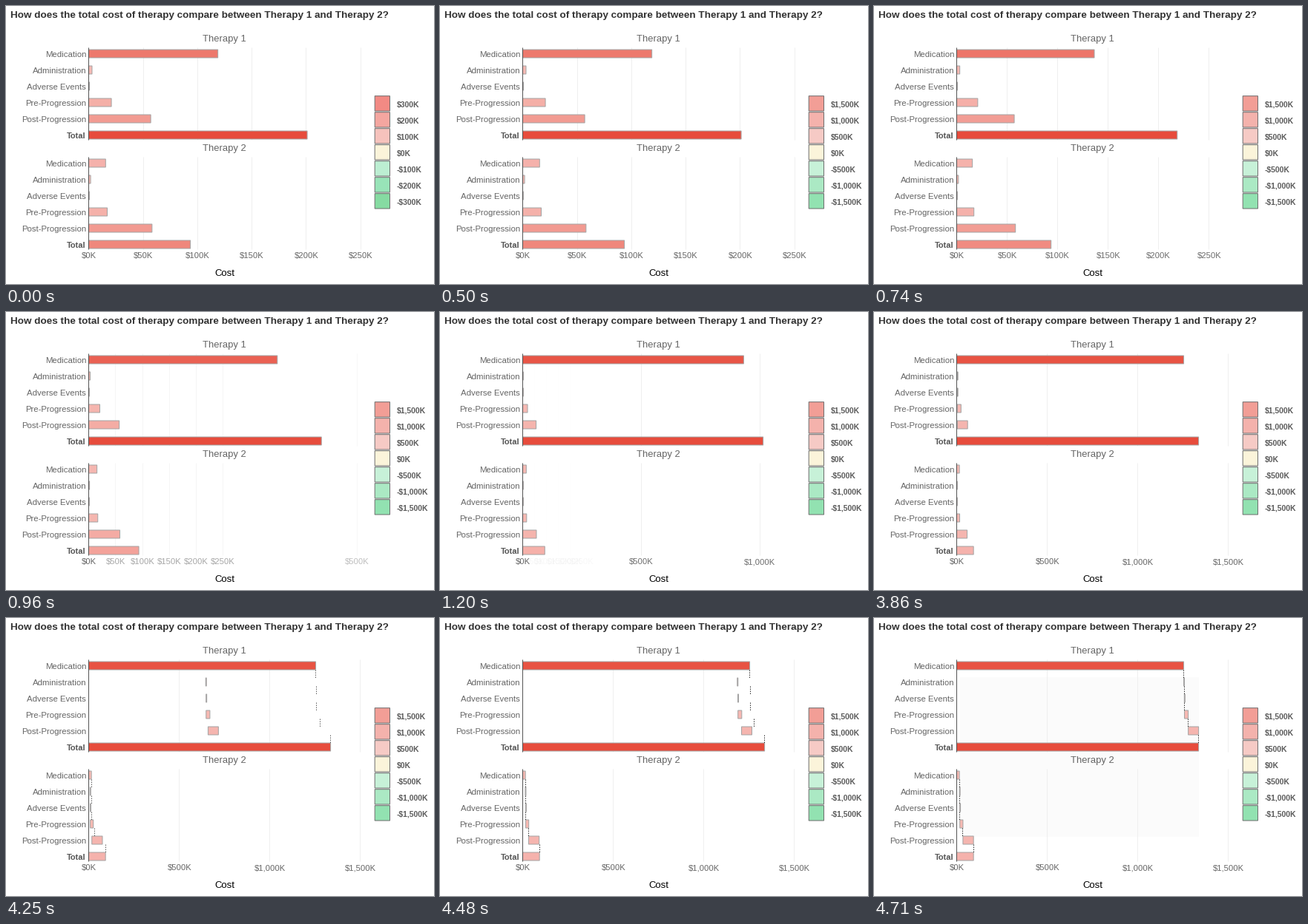
A matplotlib script for the animation above (8 s loop, 577x376 px).

```python
import numpy as np
import matplotlib.pyplot as plt
from matplotlib.animation import FuncAnimation
from matplotlib.colors import to_rgb
from matplotlib.patches import Rectangle

W, H, DPI = 577, 376, 64
LOOP, INTERVAL = 8000, 20
LEFT = 111.3
BAR_H, ROW = 11, 22
PANEL_TOPS = (56, 204)
PANEL_H = 125

ROWS = ["Medication", "Administration", "Adverse Events",
        "Pre-Progression", "Post-Progression", "Total"]
COSTS = [[119, 3.2, 0.8, 21, 57.2], [15.7, 1.9, 0.5, 17.2, 58.4]]  # $K
MED_END = 1255
K_PER_PX = (0.6826, 4.098)

PALE, STRONG = np.array(to_rgb("#f6bab4")), np.array(to_rgb("#e74c3c"))
LEGENDS = [
    (["$300K", "$200K", "$100K", "$0K", "-$100K", "-$200K", "-$300K"],
     ["#f28a84", "#f4a6a0", "#f6c2bc", "#fbf4da", "#bceed2", "#98e4b8", "#86dba2"]),
    (["$1,500K", "$1,000K", "$500K", "$0K", "-$500K", "-$1,000K", "-$1,500K"],
     ["#f29e96", "#f4b2ac", "#f6cac5", "#fbf4da", "#c7f1d8", "#abe9c4", "#92e2b1"]),
]

# Moments at which the picture is refreshed
STEPS = np.array([0, *range(500, 741, 60), *range(790, 1151, 60),
                  *range(1200, 1441, 60), *range(3860, 4101, 60), 4150, 4200,
                  *range(4250, 4551, 60), 4600, 4650, 4710])

fig = plt.figure(figsize=(W / DPI, H / DPI), dpi=DPI, facecolor="white")
ax = fig.add_axes([0, 0, 1, 1])
ax.set(xlim=(0, W), ylim=(H, 0))
ax.axis("off")


def text(x, y, s, px, color="#666666", ha="left", bold=False):
    return ax.text(x, y, s, fontsize=px * 72 / DPI, color=color, ha=ha,
                   va="baseline", family="Liberation Sans",
                   weight="bold" if bold else "normal", zorder=6)


def line(x, y0, y1, color, z, **kw):
    return ax.plot([x, x], [y0, y1], color=color, lw=72 / DPI, zorder=z,
                   solid_capstyle="butt", dash_capstyle="butt", **kw)[0]


def box(x, y, w, h, face, edge="#a4a4a4", z=3):
    patch = Rectangle((x, y), w, h, facecolor=face, edgecolor=edge,
                      lw=72 / DPI, zorder=z, snap=False)
    return ax.add_patch(patch)


def ease(t):
    t = np.clip(t, 0, 1)
    return 4 * t**3 if t < 0.5 else 1 - 4 * (1 - t)**3


class Tick:
    """A value label with its grid line in both panels."""

    def __init__(self, value):
        self.value = value
        self.label = text(0, 341.5, f"${value:,}K", 11.2, ha="center")
        self.grid = [line(0, y, y + PANEL_H, "#efefef", 1) for y in PANEL_TOPS]

    def place(self, scale, alpha):
        x = LEFT + self.value * scale
        self.label.set_x(x + 0.5)
        for art in (self.label, *self.grid):
            art.set_alpha(alpha)
            art.set_visible(alpha > 0.01 and x < W - 25)
        for g in self.grid:
            g.set_xdata([x, x])


text(6, 16, "How does the total cost of therapy compare between "
     "Therapy 1 and Therapy 2?", 13.45, "#333333", bold=True)
text(294.5, 365, "Cost", 13.1, "black", "center")

shade = box(116, 80, 322, 216, "#fbfbfb", "none", 0)
zero_tick = Tick(0)
old_ticks = [Tick(v) for v in range(50, 251, 50)]
new_ticks = [Tick(v) for v in range(500, 1501, 500)]

bars, links = [], []
for p, top in enumerate(PANEL_TOPS):
    text(294, top - 8, f"Therapy {p + 1}", 12.95, ha="center")
    line(LEFT, top, top + PANEL_H, "#555555", 5)
    bars.append([])
    links.append([])
    for i, name in enumerate(ROWS):
        y = top + 3 + i * ROW
        total = name == "Total"
        text(108, top + 13 + i * ROW, name, 11 if total else 11.4,
             "#555555" if total else "#666666", "right", total)
        bars[p].append(box(LEFT, y, 0, BAR_H, PALE))
        if not total:
            links[p].append(line(LEFT, y + BAR_H, y + ROW - 0.5, "#333333", 4,
                                 linestyle=(0, (1.5, 1.5))))

swatches = [box(497.2, 121.7 + i * ROW, 20.3, 20.3, "white", "#6e6e6e", 7)
            for i in range(7)]
keys = [text(527, 137 + i * ROW, "", 10.4, "#5c5c5c", bold=True) for i in range(7)]


def draw(n):
    ms = n * INTERVAL + INTERVAL / 2
    now = STEPS[STEPS <= ms][-1]
    grow = ease(np.interp(now, [500, 740, 1200, 1260, 1440],
                          [0, 0.157, 0.586, 0.654, 1]))
    slide = ease((now - 3775) / 940) if now >= 3860 else 0

    scale = 1 / (K_PER_PX[0] + (K_PER_PX[1] - K_PER_PX[0]) * grow)
    fade = (1 - grow)**2.4
    zero_tick.place(scale, 1)
    for tick in old_ticks:
        tick.place(scale, fade)
    for tick in new_ticks:
        tick.place(scale, 1 - fade)

    costs = [list(c) for c in COSTS]
    costs[0][0] += (MED_END - costs[0][0]) * grow
    peak = sum(costs[0])
    for p, parts in enumerate(costs):
        ends = np.cumsum(parts)
        starts = [*(ends - parts), 0]
        for bar, start, v in zip(bars[p], starts, [*parts, ends[-1]]):
            bar.set_x(LEFT + start * scale * slide)
            bar.set_width(max(v * scale, 1))
            bar.set_facecolor(PALE + (STRONG - PALE) * v / peak)
        for link, end in zip(links[p], ends):
            link.set_xdata([LEFT + end * scale - 0.5] * 2)
            link.set_alpha(min(1, 1.5 * slide))
            link.set_visible(slide > 0.01)

    names, colors = LEGENDS[int(now >= 500)]
    for swatch, key, name, color in zip(swatches, keys, names, colors):
        swatch.set_facecolor(color)
        key.set_text(name)
    shade.set_visible(now >= 4600)
    return []


anim = FuncAnimation(fig, draw, frames=LOOP // INTERVAL, interval=INTERVAL,
                     init_func=lambda: draw(0), repeat=True, repeat_delay=0,
                     blit=False)
plt.show()
```
